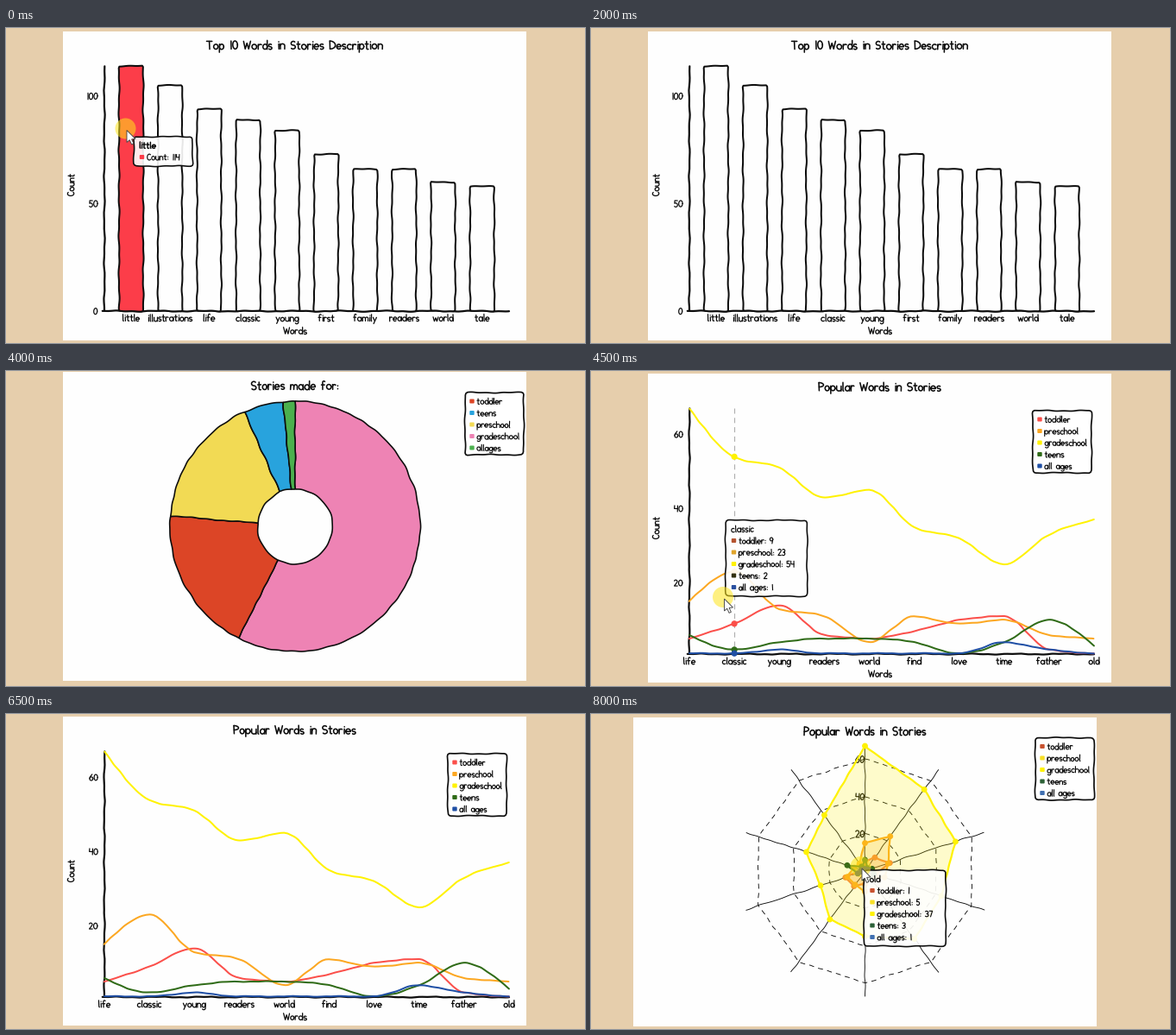
A matplotlib script that plays this animation: 671x365 px, repeating every 8500 ms.

```python
import numpy as np
import matplotlib.pyplot as plt
from matplotlib.animation import FuncAnimation
from matplotlib.collections import LineCollection
from matplotlib.lines import Line2D
from matplotlib.patches import Circle, Polygon, Rectangle

W, H, DPI = 671, 365, 100
PT = 72 / DPI                       # points per pixel
TAN, INK, YELLOW = "#e6ceac", "#0c0c0c", "#fff200"

fig = plt.figure(figsize=(W / DPI, H / DPI), dpi=DPI, facecolor=TAN)
ax = fig.add_axes([0, 0, 1, 1])


# ---- single-stroke handwriting: x-height 5, capitals 8, y upwards ----

def arc(cx, cy, rx, ry, start, end):
    t = np.radians(np.linspace(start, end, 14))
    return np.column_stack([cx + rx * np.cos(t), cy + ry * np.sin(t)])


def seg(*xy):
    return np.reshape(np.array(xy, float), (-1, 2))


def arch(x, w):
    return np.vstack([arc(x + w / 2, 3.2, w / 2, 1.8, 180, 0), seg(x + w, 0)])


def snake(cx, r, h):
    return np.vstack([arc(cx, .75 * h, r, h / 4, 40, 270),
                      arc(cx, .25 * h, r, h / 4, 90, -140)])


BOWL = arc(1.9, 2.5, 1.9, 2.5, 0, 360)
STEM, TALL = seg(0, 5, 0, 0), seg(0, 8.5, 0, 0)
CAP = seg(0, 8, 0, 0)

GLYPHS = {
    "a": [BOWL, seg(3.8, 5, 3.8, 0)],
    "b": [TALL, BOWL],
    "c": [arc(1.9, 2.5, 1.9, 2.5, 50, 310)],
    "d": [BOWL, seg(3.8, 8.5, 3.8, 0)],
    "e": [np.vstack([seg(.1, 2.5), arc(1.9, 2.5, 1.9, 2.5, 0, 310)])],
    "f": [np.vstack([arc(2.2, 6.9, 1.1, 1.6, 40, 180), seg(1.1, 0)]),
          seg(0, 4.6, 2.7, 4.6)],
    "g": [BOWL, np.vstack([seg(3.8, 5), arc(2, -1.2, 1.8, 1.8, 0, -150)])],
    "h": [TALL, arch(0, 3.6)],
    "i": [seg(.6, 5, .6, 0), seg(.6, 7, .6, 7.3)],
    "l": [seg(.3, 8.5, .3, .6, .8, 0)],
    "m": [STEM, arch(0, 2.9), arch(2.9, 2.9)],
    "n": [STEM, arch(0, 3.6)],
    "o": [BOWL],
    "p": [seg(0, 5, 0, -3), BOWL],
    "r": [STEM, arc(1.6, 3, 1.6, 2, 180, 50)],
    "s": [snake(1.4, 1.4, 5)],
    "t": [np.vstack([seg(1.2, 7.5), arc(2.1, .9, .9, .9, 180, 300)]),
          seg(0, 5, 2.7, 5)],
    "u": [np.vstack([seg(0, 5), arc(1.8, 1.8, 1.8, 1.8, 180, 360)]),
          seg(3.6, 5, 3.6, 0)],
    "v": [seg(0, 5, 1.7, 0, 3.4, 5)],
    "w": [seg(0, 5, 1.3, 0, 2.6, 4, 3.9, 0, 5.2, 5)],
    "y": [seg(0, 5, 1.9, .8), seg(3.8, 5, 1, -3)],
    "C": [arc(2.3, 4, 2.3, 4, 50, 310)],
    "D": [CAP, arc(0, 4, 4.6, 4, 90, -90)],
    "P": [CAP, arc(0, 5.8, 3.8, 2.2, 90, -90)],
    "S": [snake(2, 1.9, 8)],
    "T": [seg(0, 8, 4.4, 8), seg(2.2, 8, 2.2, 0)],
    "W": [seg(0, 8, 1.5, 0, 3, 6, 4.5, 0, 6, 8)],
    ":": [seg(.6, 3.8, .6, 4.1), seg(.6, .7, .6, 1)],
    "0": [arc(2, 4, 2, 4, 0, 360)],
    "1": [seg(.8, 8, .8, 0)],
    "2": [np.vstack([arc(1.7, 6, 1.7, 2, 160, -40), seg(0, 0, 3.6, 0)])],
    "3": [np.vstack([arc(1.5, 6, 1.7, 2, 140, -90), arc(1.5, 2, 1.9, 2, 90, -140)])],
    "4": [seg(.2, 8, 0, 4, 3.4, 4), seg(3.5, 8, 3.3, 0)],
    "5": [np.vstack([seg(3.3, 8, .4, 8, .3, 4.6), arc(1.5, 2.5, 1.9, 2.5, 120, -140)])],
    "6": [seg(2.8, 8, .7, 4.8, .05, 2.6), arc(1.8, 2.3, 1.8, 2.3, 0, 360)],
    "7": [seg(0, 8, 3.5, 8, 1.2, 0)],
    "8": [arc(1.8, 6.1, 1.5, 1.9, 0, 360), arc(1.8, 2.1, 1.8, 2.1, 0, 360)],
    "9": [arc(1.7, 5.7, 1.7, 2.3, 0, 360), seg(3.4, 5.7, 2.6, 0)],
    " ": [],
}
SQUAT = .85                         # letter height relative to the grid


def advance(ch):
    strokes = GLYPHS[ch]
    return max(s[:, 0].max() for s in strokes) + 1.25 if strokes else 4


def text_width(label, scale=1.0):
    return scale * (sum(map(advance, label)) - 1.25)


# ---- drawing helpers ----

def add(artist):
    artist.set_zorder(len(ax.get_children()))
    ax.add_artist(artist)


def rough(pts, amp=.4):
    x, y = np.asarray(pts, float).T
    dx = np.sin(.23 * x + .13 * y) + .6 * np.sin(.17 * x - .31 * y + 1)
    dy = np.sin(.12 * x - .21 * y + 2) + .6 * np.sin(.34 * x + .15 * y)
    return np.column_stack([x + amp * dx, y + amp * dy])


def dense(pts, step=2):
    pts = np.asarray(pts, float)
    dist = np.r_[0, np.cumsum(np.hypot(*np.diff(pts, axis=0).T))]
    t = np.linspace(0, dist[-1], max(2, int(dist[-1] / step)))
    return np.column_stack([np.interp(t, dist, pts[:, k]) for k in (0, 1)])


def stroke(pts, color=INK, width=2.0, amp=.4, dash="-"):
    pts = rough(dense(pts), amp)
    add(Line2D(*pts.T, color=color, lw=width * PT, ls=dash,
               solid_capstyle="round", solid_joinstyle="round"))


def shape(pts, fill, edge=INK, width=1.8, amp=.4):
    pts = rough(dense(np.vstack([pts, pts[:1]])), amp)
    add(Polygon(pts, fc=fill, ec=edge, lw=width * PT, joinstyle="round"))


def box(x0, y0, x1, y1, r=3):
    corners = [(x1 - r, y0 + r, -90), (x1 - r, y1 - r, 0),
               (x0 + r, y1 - r, 90), (x0 + r, y0 + r, 180)]
    return np.vstack([arc(x, y, r, r, a, a + 90) for x, y, a in corners])


def write(label, x, y, scale=1.1, align=.5, weight=1.15, upright=False):
    """Write with the baseline at y; align 0 left, .5 centre, 1 right."""
    pen, lines = -align * text_width(label, scale), []
    for ch in label:
        for s in GLYPHS[ch]:
            u, v = pen + scale * s[:, 0], scale * SQUAT * s[:, 1]
            pts = [x - v, y - u] if upright else [x + u, y - v]
            lines.append(rough(np.column_stack(pts), .2))
        pen += scale * advance(ch)
    add(LineCollection(lines, colors=INK, linewidths=weight * scale * PT,
                       capstyle="round", joinstyle="round"))


def swatch(x, y, color):
    add(Polygon(box(x - 2.7, y - 2.5, x + 2.7, y + 2.5, 1), fc=color, ec="none"))


def panel(x, y, title, title_y):
    add(Rectangle((x, y), 537, 358, fc="#fefefe", ec="none"))
    write(title, x + 268.5, title_y, 1.37)


def legend(x, y, names, colors):
    shape(box(x, y, x + 68, y + 72), "white", width=1.7)
    for i, (name, color) in enumerate(zip(names, colors)):
        cy = y + 10 + 13.5 * i
        swatch(x + 8, cy, color)
        write(name, x + 14, cy + 3.5, 1.0, 0)


def tooltip(cursor, title, items, gap, flip=True, bold=1.15):
    cx, cy = cursor
    w = max([text_width(title) + 15] + [text_width(s) + 31 for s, _ in items])
    h = 20.5 + 13.5 * len(items)
    x = cx + 2 - w if flip and cx > W / 2 else cx + gap
    y = cy - 1 - h if flip and cy > H / 2 else cy + gap
    shape(box(x, y, x + w, y + h), (1, 1, 1, .9), width=1.6)
    write(title, x + 7, y + 13.5, 1.03, 0, bold)
    for i, (label, color) in enumerate(items):
        yi = y + 23.5 + 13.5 * i
        swatch(x + 9.5, yi, color)
        write(label, x + 15.5, yi + 3.5, 1.0, 0)


ARROW = seg(0, 0, 0, 14, 3.2, 11.2, 5.6, 16.4, 7.9, 15.3, 5.6, 10.4, 10, 10)


def pointer(cursor):
    add(Circle(cursor, 12, fc=(1, .9, .1, .55), ec="none"))
    add(Polygon(ARROW + cursor + (1.5, 2), fc="white", ec="#444444", lw=.9 * PT))


def axes_frame(top, ticks):
    for label, y in ticks:
        write(label, 106, y + 3.6, 1.05, 1)
    write("Words", 335, 354.5)
    write("Count", 79, 182, upright=True)
    stroke([(114, top), (114, 328)], width=2.2)
    stroke([(112, 328), (583, 328)], width=2.2)


# ---- bar chart ----

BAR_WORDS = ("little illustrations life classic young first family readers "
             "world tale").split()
BAR_COUNTS = [114, 105, 94, 89, 84, 73, 66, 66, 60, 58]
RED = "#fc3d49"


def bars(hover, cursor):
    panel(66, 4, "Top 10 Words in Stories Description", 24.5)
    axes_frame(44, [(str(v), 328 - 2.49 * v) for v in (0, 50, 100)])
    for i, (word, n) in enumerate(zip(BAR_WORDS, BAR_COUNTS)):
        x, top = 145 + 45.2 * i, 328 - 2.49 * n
        shape(box(x - 14, top, x + 14, 328, 1), RED if i == hover else "#fefefe",
              width=2)
        write(word, x, 339.7)
    if cursor:
        tooltip(cursor, BAR_WORDS[hover], [(f"Count: {BAR_COUNTS[hover]}", RED)],
                9.5, bold=1.45)


# ---- doughnut ----

PIE = [("gradeschool", 226, "#ee83b4"), ("toddler", 74, "#dc4526"),
       ("preschool", 67, "#f2da54"), ("teens", 20, "#28a3dd"),
       ("allages", 6, "#4bb04e")]
PIE_LEGEND = (1, 3, 2, 0, 4)


def faded(color, alpha=.6):
    rgb = np.array([int(color[k:k + 2], 16) / 255 for k in (1, 3, 5)])
    return tuple(alpha * rgb + 1 - alpha)


def doughnut(hover, cursor):
    panel(66, 1, "Stories made for:", 21.5)
    total, start = sum(p[1] for p in PIE), -90
    for i, (_, n, color) in enumerate(PIE):
        end = start + 360 * n / total
        ring = np.vstack([arc(335, 180, 145, 145, a, a + (end - start) / 6)
                          for a in np.linspace(start, end, 7)[:-1]])
        hole = 335, 180
        inner = hole + (ring[::-1] - hole) * 43.5 / 145
        shape(np.vstack([ring, inner]), faded(color) if i == hover else color,
              width=1.6)
        start = end
    legend(532, 25, [PIE[k][0] for k in PIE_LEGEND], [PIE[k][2] for k in PIE_LEGEND])
    if cursor:
        name, n, color = PIE[hover]
        tooltip(cursor, name, [(f": {n}", color)], 10, flip=False, bold=1.45)


# ---- line and radar charts share their data ----

WORDS = "life classic young readers world find love time father old".split()
GROUPS = {
    "toddler": [5, 9, 14, 6, 5, 7, 10, 11, 2, 1],
    "preschool": [15, 23, 13, 11, 4, 11, 9, 10, 6, 5],
    "gradeschool": [67, 54, 51, 43, 45, 35, 32, 25, 33, 37],
    "teens": [6, 2, 4, 5, 5, 4, 1, 4, 10, 3],
    "all ages": [1, 1, 2, 1, 1, 1, 1, 4, 2, 1],
}
LINE_COLORS = ["#fb4f4a", "#fca721", YELLOW, "#2f6b17", "#1f4fa5"]
LINE_TIPS = ["#b5532f", "#e0a52c", YELLOW, "#33300f", "#2a50a0"]
RADAR_COLORS = ["#f5823c", "#fca721", YELLOW, "#3a6b17", "#2a3f6b"]
RADAR_LEGEND = ["#c8522f", "#f7df25", YELLOW, "#2c6136", "#4070b0"]


def word_items(i, colors):
    return [(f"{name}: {vals[i]}", c)
            for (name, vals), c in zip(GROUPS.items(), colors)]


def monotone(x, y, n=14):
    """Monotone cubic through evenly spaced points."""
    h = x[1] - x[0]
    s = np.diff(y) / h
    a, b = s[:-1], s[1:]
    size = np.minimum(np.minimum(abs(a), abs(b)), abs(a + b) / 4)
    m = (np.sign(a) + np.sign(b)) * size
    m = np.r_[(3 * s[0] - m[0]) / 2, m, (3 * s[-1] - m[-1]) / 2]
    t = np.linspace(0, 1, n)
    parts = []
    for i in range(len(s)):
        v = ((2 * t**3 - 3 * t**2 + 1) * y[i] + (3 * t**2 - 2 * t**3) * y[i + 1]
             + h * ((t**3 - 2 * t**2 + t) * m[i] + (t**3 - t**2) * m[i + 1]))
        parts.append(np.column_stack([x[i] + h * t, v]))
    return np.vstack(parts)


def lines(hover, cursor):
    panel(66, 3, "Popular Words in Stories", 23)
    axes_frame(43, [(str(v), 331.5 - 4.3 * v) for v in (20, 40, 60)])
    xs = 114 + 52.1 * np.arange(10)
    for x, word in zip(xs, WORDS):
        write(word, x, 339.7)
    if cursor:
        add(Line2D([xs[hover]] * 2, [43, 328], color="#b0b0b0", lw=1.2 * PT,
                   dashes=(5, 4)))
    for vals, color in zip(GROUPS.values(), LINE_COLORS):
        ys = 331.5 - 4.3 * np.array(vals)
        stroke(monotone(xs, ys), color, 2, .3)
        if cursor:
            add(Circle((xs[hover], ys[hover]), 3.6, fc=color, ec="none"))
    legend(512, 46, GROUPS, LINE_COLORS)
    if cursor:
        tooltip(cursor, WORDS[hover], word_items(hover, LINE_TIPS), 3)


def radar(hover, cursor):
    panel(49, 4, "Popular Words in Stories", 24.5)
    centre, unit = np.array([317.5, 182]), 145 / 67
    t = 2 * np.pi * np.arange(10) / 10
    spokes = np.column_stack([np.sin(t), -np.cos(t)])
    for v in (20, 40, 60):
        ring = centre + spokes * v * unit
        stroke(np.vstack([ring, ring[:1]]), width=.9, dash=(0, (6.5, 5.5)))
    for d in spokes:
        stroke([centre, centre + d * 145], width=.9)
    for v in (20, 40, 60):
        write(str(v), 316.5, centre[1] - v * unit + 4, 1.1, 1)
    for vals, color in zip(GROUPS.values(), RADAR_COLORS):
        pts = centre + spokes * np.array(vals)[:, None] * unit
        shape(pts, color + "33", color, 2.2, .3)
        for p in pts:
            add(Circle(p, 3.4, fc=color, ec="none"))
    legend(515, 27.5, GROUPS, RADAR_LEGEND)
    tooltip(cursor, WORDS[hover], word_items(hover, RADAR_LEGEND), 4)


# One entry per half second: chart, hovered item, pointer position.
STEPS = [
    (bars, 0, (138.5, 116.5)), (bars, 3, (282, 158)), (bars, 7, (452, 235)),
    (bars, 9, (555, 255)), (bars, None, None),
    (doughnut, 0, (427, 205.5)), (doughnut, 4, (327, 75)),
    (doughnut, 2, (236, 120)), (doughnut, None, None),
    (lines, 1, (153, 262)), (lines, 3, (251, 262)), (lines, 7, (500, 305)),
    (lines, 9, (572, 290)), (lines, None, None),
    (radar, 9, (270, 117.5)), (radar, 8, (253, 174)), (radar, 9, (312.5, 177)),
]


def update(frame):
    ax.clear()
    ax.set(xlim=(0, W), ylim=(H, 0))
    ax.axis("off")
    chart, hover, cursor = STEPS[frame]
    chart(hover, cursor)
    if cursor:
        pointer(cursor)
    return []


anim = FuncAnimation(fig, update, frames=len(STEPS), interval=500,
                     repeat=True, repeat_delay=0)
plt.show()
```
